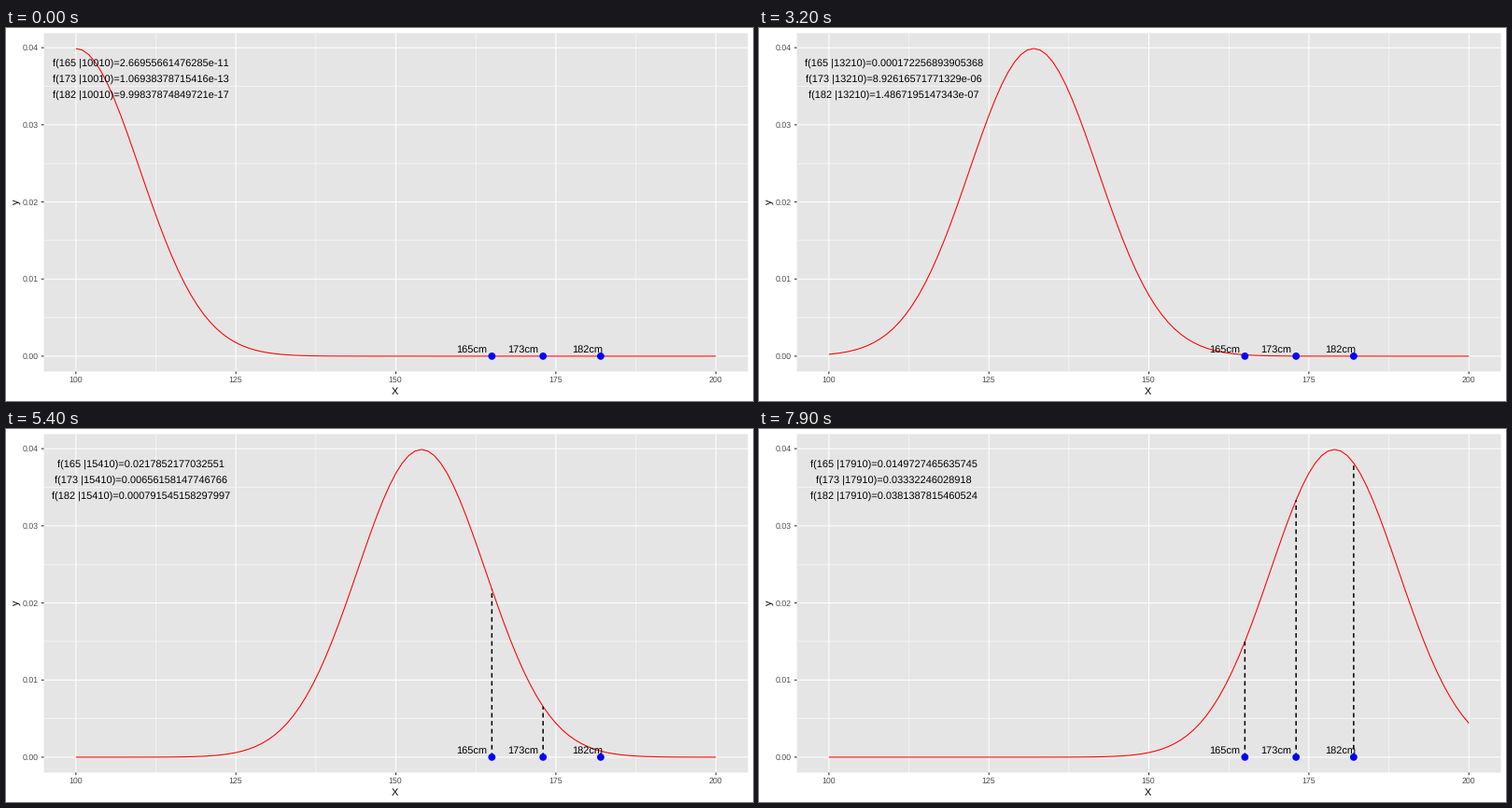
These frames come from a looping animation (800 by 400 pixels, 8 s). A matplotlib script:

```python
import math

import numpy as np
import matplotlib.pyplot as plt
from matplotlib.animation import FuncAnimation
from matplotlib.patches import Circle, Rectangle

plt.rcParams["font.family"] = "Liberation Sans"
plt.rcParams["text.hinting"] = "none"
plt.rcParams["text.kerning_factor"] = 6  # practically no kerning

FRAMES, INTERVAL = 80, 100
PX = 0.72  # points per pixel at 100 dpi
SD = 10
HEIGHTS = (165, 173, 182)
PEAK = 1 / math.sqrt(2 * math.pi)

# Panel edges; the data fill it with a 5 % margin on each side.
LEFT, RIGHT, TOP, BOTTOM = 40.6, 794.5, 5.5, 368.4
X_UNIT = (RIGHT - LEFT) / 110
Y_UNIT = (BOTTOM - TOP) / 1.1 / (PEAK / SD)

fig = plt.figure(figsize=(8, 4), dpi=100, facecolor="white")
ax = fig.add_axes([0, 0, 1, 1])
ax.set_xlim(0, 800)
ax.set_ylim(400, 0)
ax.axis("off")


def sx(x):
    return LEFT + (x - 95) * X_UNIT


def sy(y):
    return BOTTOM - (y + 0.05 * PEAK / SD) * Y_UNIT


def density(x, mu):
    """Normal density, with the exponent split in the tails for accuracy."""
    z = abs(x - mu) / SD
    if z < 5:
        return PEAK * math.exp(-0.5 * z * z) / SD
    a = round(z * 65536) / 65536
    b = z - a
    return PEAK / SD * (math.exp(-0.5 * a * a) * math.exp((-0.5 * b - a) * b))


def label(x, y, text, size=11.04, color="black", ha="center"):
    """Text with digits centred on y; x allows for the side bearings."""
    return ax.text(x - 0.07 * size, y + 0.36 * size, text, fontsize=size * PX,
                   color=color, ha=ha, va="baseline", zorder=5)


def rule(xs, ys, width, color="white", **kw):
    return ax.plot(xs, ys, color=color, lw=width * PX, snap=False,
                   solid_capstyle="butt", **kw)[0]


def build_panel():
    ax.add_patch(Rectangle((LEFT, TOP), RIGHT - LEFT, BOTTOM - TOP,
                           color="#E5E5E5", lw=0, snap=False, zorder=0))
    for x in np.arange(112.5, 200, 25):
        rule([sx(x)] * 2, [TOP, BOTTOM], 0.53, zorder=1)
    for y in np.arange(0.005, 0.04, 0.01):
        rule([LEFT, RIGHT], [sy(y)] * 2, 0.53, zorder=1)
    for x in range(100, 201, 25):
        rule([sx(x)] * 2, [TOP, BOTTOM], 1.07, zorder=1)
        rule([sx(x)] * 2, [BOTTOM, BOTTOM + 2.75], 1.07, "#333333")
        label(sx(x), 376.7, str(x), 8.8, "#4D4D4D")
    for y in np.arange(5) / 100:
        rule([LEFT, RIGHT], [sy(y)] * 2, 1.07, zorder=1)
        rule([LEFT - 2.75, LEFT], [sy(y)] * 2, 1.07, "#333333")
        label(LEFT - 4.95, sy(y), f"{y:.2f}", 8.8, "#4D4D4D", "right")
    label((LEFT + RIGHT) / 2, 389, "X", 11)
    ax.text(11.9, 186.3, "y", fontsize=11 * PX, rotation=90,
            ha="center", va="center")


build_panel()
grid_x = np.arange(100, 201)
curve = rule([], [], 1.07, "red", zorder=2)
stems, readouts = [], []
for i, (h, at) in enumerate(zip(HEIGHTS, (162, 170, 180))):
    stems.append(rule([], [], 1.5, "black", zorder=3, dash_capstyle="butt",
                      linestyle=(0.17, (4.8 / 1.5, 3.76 / 1.5))))
    ax.add_patch(Circle((sx(h), sy(0)), 3.9, color="blue", lw=0, zorder=4))
    label(sx(at), sy(0.001) + 0.5, f"{h}cm")
    readouts.append(label(145, sy(0.038 - 0.002 * i) + 0.5, ""))


def draw(frame):
    mu = 100 + frame
    curve.set_data(sx(grid_x), [sy(density(x, mu)) for x in grid_x])
    for h, stem, text in zip(HEIGHTS, stems, readouts):
        d = density(h, mu)
        stem.set_data([sx(h)] * 2, [sy(0), sy(d)])
        text.set_text(f"f({h} |{mu}{SD})={d:.15g}")
    return [curve, *stems, *readouts]


anim = FuncAnimation(fig, draw, frames=FRAMES, interval=INTERVAL,
                     init_func=lambda: draw(0), repeat=True, repeat_delay=0)
plt.show()
```
